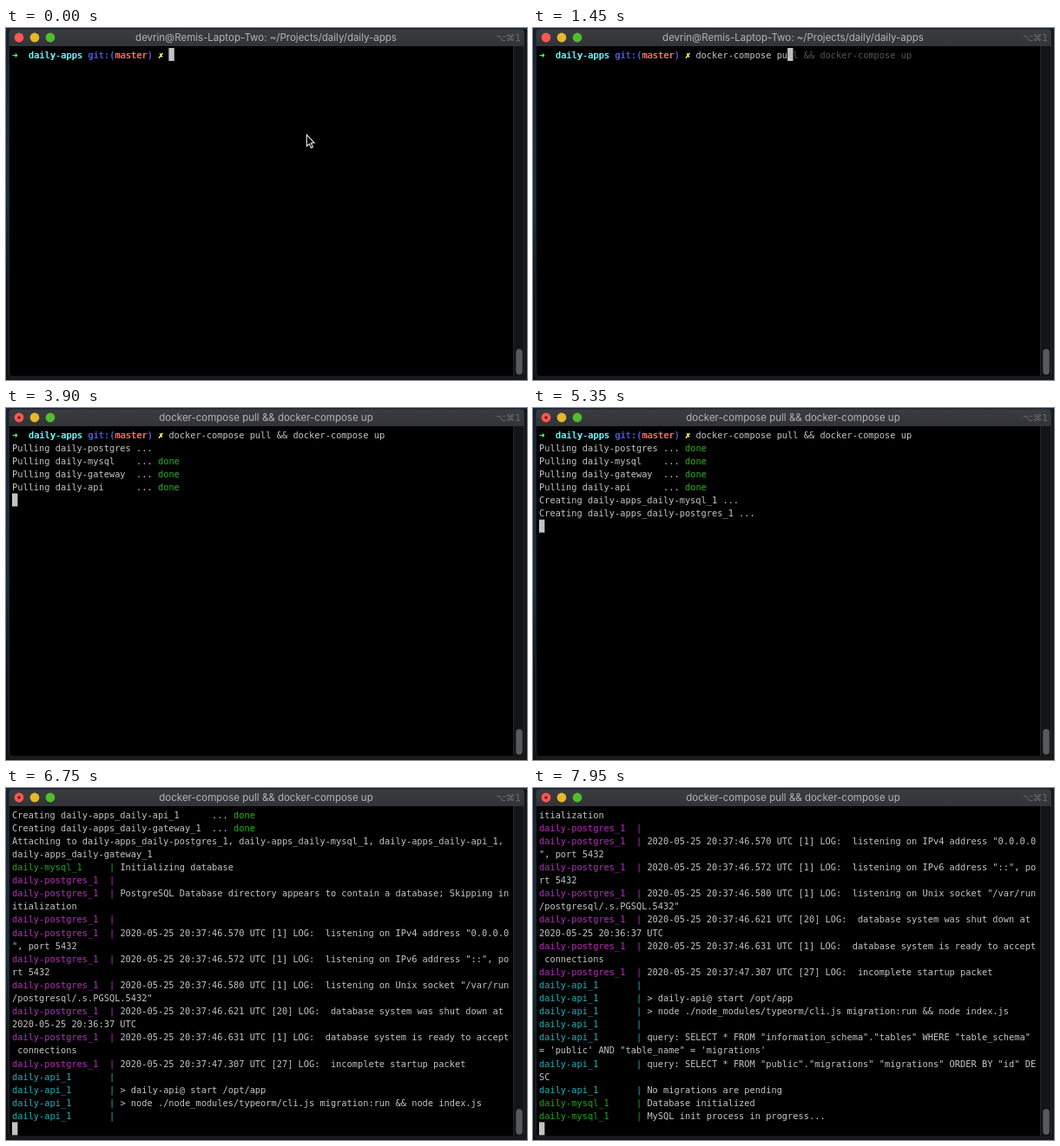
Animation of 600 by 406 pixels, one loop 8 s. Source, as an HTML page with a canvas:

```html
<!DOCTYPE html>
<html lang="en">
<head>
<meta charset="utf-8">
<title>Terminal</title>
<style>
  html, body { margin: 0; width: 100%; height: 100%; overflow: hidden; background: #0b0e13; }
  canvas { display: block; width: 600px; height: 406px; }
</style>
</head>
<body>
<canvas id="stage" width="600" height="406"></canvas>
<script>
const ctx = document.getElementById('stage').getContext('2d');
const LOOP = 8000, COLS = 92, ROWS = 25;
const LEFT = 7, TOP = 23, CELL = 6.22, ROW = 15.1;
const MONO = '10.33px "DejaVu Sans Mono", monospace';
const COLOR = {
  text: '#c4c4c4', ghost: '#565656', done: '#25b31f', mysql: '#1ea51c',
  postgres: '#b52eb8', api: '#20b0b8', arrow: '#5ff967', path: '#60fdff',
  git: '#4d58cf', branch: '#ff6b67', cross: '#fefb67'
};

const COMMAND = 'docker-compose pull && docker-compose up';
const TYPE_START = 650, KEY_TIME = 50, ACCEPT = 1700, ENTER = 2000;
const ALIGN = 5550;   // container names line up once the longest is known

const typedCount = t => t < TYPE_START ? 0
  : t >= ACCEPT ? COMMAND.length
  : Math.min(19, 1 + Math.floor((t - TYPE_START) / KEY_TIME));

function prompt(t) {
  const n = typedCount(t);
  return [
    ['➜  ', 'arrow', true], ['daily-apps ', 'path', true], ['git:(', 'git', true],
    ['master', 'branch', true], [') ', 'git', true], ['✗ ', 'cross', true],
    [COMMAND.slice(0, n), 'text'], [n ? COMMAND.slice(n) : '', 'ghost']
  ];
}

const job = (label, width, at, doneAt, alignAt = 0) => ({
  at,
  parts: t => [[label.padEnd(t >= alignAt ? width : 0) + ' ... ', 'text'],
               [t >= doneAt ? 'done' : '', 'done']]
});
const pull = (name, doneAt) => job('Pulling daily-' + name, 22, 2700, doneAt);
const create = (name, at, doneAt) =>
  job(`Creating daily-apps_daily-${name}_1`, 36, at, doneAt, ALIGN);
const log = (at, name, message = '') => ({
  at,
  parts: () => [[`daily-${name}_1`.padEnd(18) + '| ', name], [message, 'text']]
});
const pgLog = (at, time, pid, message) =>
  log(at, 'postgres', `2020-05-25 20:37:${time} UTC [${pid}] LOG:  ${message}`);

const LINES = [
  { at: 0, parts: prompt },
  pull('postgres', 4250), pull('mysql', 3300), pull('gateway', 3500), pull('api', 3700),
  create('mysql', 5100, 5500), create('postgres', 5100, 5550),
  create('api', ALIGN, 5700), create('gateway', 5600, 5750),
  { at: 5800, parts: () => [['Attaching to ' + ['postgres', 'mysql', 'api', 'gateway']
      .map(name => `daily-apps_daily-${name}_1`).join(', '), 'text']] },
  log(5800, 'mysql', 'Initializing database'),
  log(5850, 'postgres'),
  log(5850, 'postgres', 'PostgreSQL Database directory appears to contain a database; Skipping initialization'),
  log(5850, 'postgres'),
  pgLog(5850, '46.570', 1, 'listening on IPv4 address "0.0.0.0", port 5432'),
  pgLog(5850, '46.572', 1, 'listening on IPv6 address "::", port 5432'),
  pgLog(5850, '46.580', 1, 'listening on Unix socket "/var/run/postgresql/.s.PGSQL.5432"'),
  pgLog(5900, '46.621', 20, 'database system was shut down at 2020-05-25 20:36:37 UTC'),
  pgLog(5900, '46.631', 1, 'database system is ready to accept connections'),
  pgLog(6000, '47.307', 27, 'incomplete startup packet'),
  log(6350, 'api'),
  log(6350, 'api', '> daily-api@ start /opt/app'),
  log(6350, 'api', '> node ./node_modules/typeorm/cli.js migration:run && node index.js'),
  log(6350, 'api'),
  log(6900, 'api', `query: SELECT * FROM "information_schema"."tables" WHERE "table_schema" = 'public' AND "table_name" = 'migrations'`),
  log(6900, 'api', 'query: SELECT * FROM "public"."migrations" "migrations" ORDER BY "id" DESC'),
  log(6950, 'api', 'No migrations are pending'),
  log(7800, 'mysql', 'Database initialized'),
  log(7800, 'mysql', 'MySQL init process in progress...')
];

// Splits coloured parts into runs placed on wrapped rows.
function layout(t) {
  const runs = [];
  let row = -1;
  for (const line of LINES) {
    if (line.at > t) continue;
    row++;
    let col = 0;
    for (let [text, color, bold] of line.parts(t)) {
      while (text) {
        if (col === COLS) { col = 0; row++; }
        const piece = text.slice(0, COLS - col);
        runs.push({ row, col, text: piece, color: COLOR[color], bold });
        col += piece.length;
        text = text.slice(piece.length);
      }
    }
  }
  return { runs, rows: row + 1 };
}

function box(x, y, w, h, radius, fill) {
  ctx.fillStyle = fill;
  ctx.beginPath();
  ctx.roundRect(x, y, w, h, radius);
  ctx.fill();
}

function label(text, x, y, font, color, align = 'left') {
  ctx.font = font;
  ctx.fillStyle = color;
  ctx.textAlign = align;
  ctx.fillText(text, x, y);
}

function disc(x, y, r, color) {
  ctx.fillStyle = color;
  ctx.beginPath();
  ctx.arc(x, y, r, 0, 7);
  ctx.fill();
}

function verticalGradient(y0, y1, colors) {
  const gradient = ctx.createLinearGradient(0, y0, 0, y1);
  colors.forEach((color, i) => gradient.addColorStop(i / (colors.length - 1), color));
  return gradient;
}

function drawWindow(running) {
  box(0, 0, 600, 406, 0, '#15181c');
  box(0, 0, 4, 406, 0, verticalGradient(0, 406, ['#141e30', '#1b2b42', '#123144', '#10151c', '#0e141c']));
  box(0, 0, 600, 2, 0, '#17253b');

  box(3, 1, 594, 401.5, [5, 5, 5, 5], '#232529');
  box(4, 21, 592, 380.5, [0, 0, 4, 4], '#000');
  box(3.5, 1.5, 593, 19.5, [4, 4, 0, 0], verticalGradient(1, 21, ['#3b3c3f', '#333437']));
  box(584, 21, 12, 380, [0, 0, 4, 0], '#141414');
  box(584, 21, 1, 380, 0, '#262626');
  box(587.3, 370.3, 7.4, 29.4, 3.7, '#5a5a5a');

  ['#fd5754', '#e5b82c', '#4fbd2d'].forEach((color, i) => disc(15 + 18 * i, 11, 5.4, color));
  if (running) disc(15, 11, 1.7, '#7d120d');
  const title = running ? COMMAND : 'devrin@Remis-Laptop-Two: ~/Projects/daily/daily-apps';
  label(title, 299.5, 15, '11.5px Inter, Roboto, sans-serif', '#b3b4b5', 'center');
  label('⌥⌘1', 593, 15, '10.5px "DejaVu Sans", sans-serif', '#6a6c6e', 'right');
}

function drawPointer() {
  ctx.beginPath();
  [[346.3, 123.2], [346.3, 136.2], [349.3, 133.6], [351.3, 138.3], [353.3, 137.4],
   [351.4, 132.8], [355, 132.4]].forEach(([x, y]) => ctx.lineTo(x, y));
  ctx.closePath();
  ctx.fillStyle = '#000';
  ctx.fill();
  ctx.strokeStyle = '#eee';
  ctx.lineWidth = 1.1;
  ctx.stroke();
}

function draw(t) {
  const entered = t >= ENTER;
  const typed = typedCount(t);
  drawWindow(entered);

  const { runs, rows } = layout(t);
  const scroll = Math.max(0, rows + 1 - ROWS);
  const baseline = row => TOP + 11.6 + ROW * row;
  for (const { row, col, text, color, bold } of runs) {
    if (row < scroll) continue;
    const x = LEFT + CELL * col, y = baseline(row - scroll);
    label(text, x, y, MONO, color);
    if (bold) label(text, x + 0.6, y, MONO, color);   // synthetic bold
  }

  const cursorRow = entered ? rows - scroll : 0;
  const cursorX = LEFT + CELL * (entered ? 0 : 29 + typed);
  box(cursorX, TOP + ROW * cursorRow, 6.4, 15, 0, '#c2c2c2');
  if (!entered && typed) label(COMMAND[typed] || '', cursorX, baseline(0), MONO, '#adadad');
  if (t < TYPE_START) drawPointer();
}

const start = performance.now();
function tick() {
  draw((performance.now() - start) % LOOP);
  requestAnimationFrame(tick);
}
tick();
</script>
</body>
</html>
```
